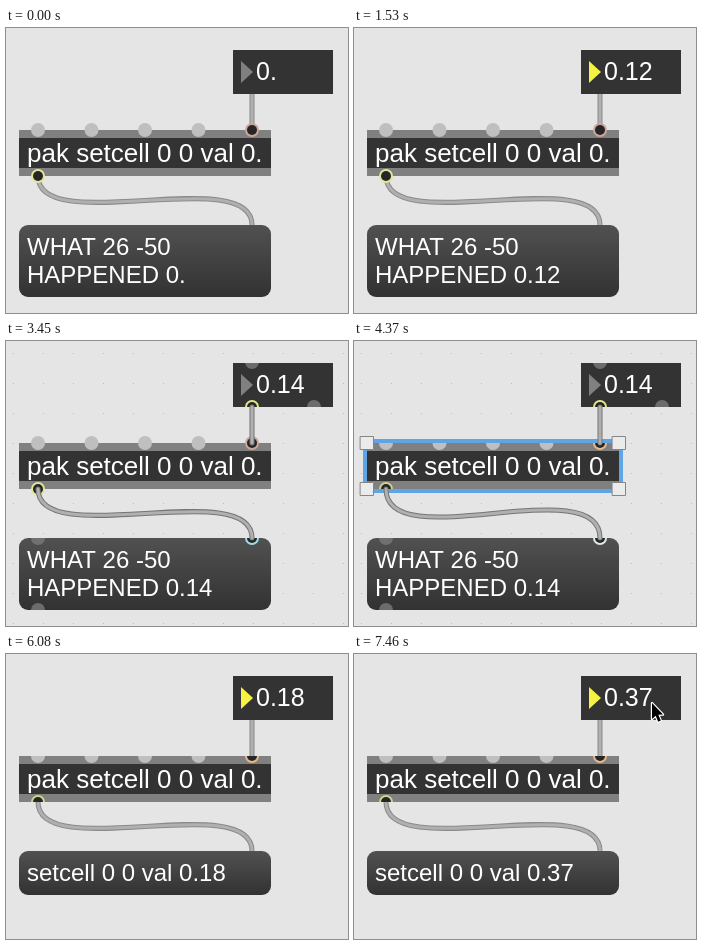
Animation, 342 px wide and 285 px high, one loop 7.5 s. Source, as an HTML page with a canvas:

```html
<!DOCTYPE html>
<html lang="en">
<head>
<meta charset="utf-8">
<title>Patch</title>
<style>
html, body { margin: 0; width: 100%; height: 100%; overflow: hidden; background: #e5e5e5; }
canvas { display: block; width: 342px; height: 285px; }
</style>
</head>
<body>
<canvas id="stage" width="342" height="285"></canvas>
<script>
const LOOP = 7500;
const UNLOCK = 2110, REBUILD = 4220, LOCK = 5320, DRAG = 5890;
const INLETS = [32, 85.5, 139, 192.5];
const canvas = document.getElementById('stage');
const ctx = canvas.getContext('2d');
const ratio = window.devicePixelRatio || 1;
canvas.width = 342 * ratio;
canvas.height = 285 * ratio;

// Pointer routes: [time, x, y]
const ROUTES = [
  [[1730, 298, 70], [1920, 287, 176], [2110, 287, 176], [2400, 264, 130], [2600, 264, 130], [2700, 257, 122]],
  [[5110, 262, 130], [5250, 292, 178], [5350, 292, 178], [5850, 298, 49], [5890, 298, 49]],
  [[6550, 298, 49], [6670, 298, 49]],
  [[7460, 298, 49], [7500, 298, 49]]
];

const within = (t, a, b) => t >= a && t < b;
const stepAt = (t, start, len, max) => Math.min(max, Math.floor((t - start) / len));

// Dragged value in hundredths
function valueAt(t) {
  if (t < 90) return 0;
  if (t < 930) return 8 - Math.abs(8 - stepAt(t, 90, 45, 16));
  if (t < DRAG) return stepAt(t, 930, 46, 15) - 1;
  if (t < 6670) return 14 + stepAt(t, DRAG, 47, 13);
  const k = stepAt(t, 6670, 41.6, 18);
  return 41 - Math.abs(14 - k);
}

const format = v => v === 0 ? '0.' : String(v / 100);

function pointerAt(t) {
  for (const route of ROUTES) {
    for (let i = 1; i < route.length; i++) {
      const [t0, x0, y0] = route[i - 1], [t1, x1, y1] = route[i];
      if (!within(t, t0, t1)) continue;
      const p = (t - t0) / (t1 - t0), e = p * p * (3 - 2 * p);
      return [x0 + (x1 - x0) * e, y0 + (y1 - y0) * e];
    }
  }
  return null;
}

function rect(x, y, w, h, color) {
  ctx.fillStyle = color;
  ctx.fillRect(x, y, w, h);
}

function disk(x, y, r, color) {
  ctx.beginPath();
  ctx.arc(x, y, r, 0, 7);
  ctx.fillStyle = color;
  ctx.fill();
}

function port(x, y, ring) {
  disk(x, y, 7, ring);
  disk(x, y, 5, '#262626');
}

function label(text, x, y, size) {
  ctx.font = size + 'px "Liberation Sans", Arial, sans-serif';
  ctx.fillStyle = '#fff';
  ctx.fillText(text, x, y);
}

function clipped(x, y, w, h, draw) {
  ctx.save();
  ctx.beginPath();
  ctx.rect(x, y, w, h);
  ctx.clip();
  draw();
  ctx.restore();
}

function polygon(points, color) {
  ctx.beginPath();
  points.forEach(([x, y]) => ctx.lineTo(x, y));
  ctx.closePath();
  ctx.fillStyle = color;
  ctx.fill();
}

function grid() {
  for (let x = 7; x < 342; x += 30)
    for (let y = 12; y < 285; y += 30) rect(x, y, 1, 1, '#bdbdbd');
}

function numberBox(v, active, open) {
  rect(227, 22, 100, 44, '#333');
  if (open) clipped(227, 22, 100, 44, () => {
    disk(246, 21, 7, '#6c6c6c');
    disk(308, 66, 7, '#6c6c6c');
    port(246, 66, '#e6e58a');
  });
  polygon([[235, 33], [247, 44], [235, 55]], active ? '#f5f243' : '#808080');
  label(format(v), 250, 52, 25);
}

function messageBox(lines, open, ring) {
  const h = lines.length > 1 ? 72 : 44;
  const fill = ctx.createLinearGradient(0, 197, 0, 197 + h);
  fill.addColorStop(0, '#515151');
  fill.addColorStop(1, '#323232');
  ctx.beginPath();
  ctx.roundRect(13, 197, 252, h, 9);
  ctx.fillStyle = fill;
  ctx.fill();
  if (open) clipped(13, 197, 252, h, () => {
    disk(32, 197, 7, '#707070');
    disk(32, 197 + h, 7, '#6c6c6c');
    port(246, 197, ring);
  });
  lines.forEach((s, i) => label(s, 21, 227 + i * 27.5, 24));
}

function objectBox(rebuilt, outlined) {
  if (outlined) rect(9, 98, 260, 54, '#5f a5e6'.replace(' ', ''));
  rect(13, 102, 252, 46, '#808080');
  rect(13, 110, 252, 30, '#333');
  const ports = () => {
    INLETS.forEach(x => disk(x, 102, 7, '#bfbfbf'));
    port(246, 102, rebuilt ? '#e5b98c' : '#cda49e');
    port(32, 148, rebuilt ? '#cfd48a' : '#e3e59a');
  };
  if (rebuilt) clipped(13, 102, 252, 46, ports);
  else ports();
  label('pak setcell 0 0 val 0.', 21, 134, 26);
}

function handles() {
  ctx.lineWidth = 1;
  ctx.strokeStyle = '#858585';
  for (const x of [13, 265])
    for (const y of [102, 148]) {
      rect(x - 7, y - 7, 14, 14, '#ebebeb');
      ctx.strokeRect(x - 6.5, y - 6.5, 13, 13);
    }
}

function cords(open, bend) {
  const trace = () => {
    ctx.beginPath();
    ctx.moveTo(246, 66);
    ctx.lineTo(246, 102);
    ctx.moveTo(32, 148);
    ctx.bezierCurveTo(32, 148 + bend, 246, 197 - bend, 246, 197);
  };
  ctx.lineCap = open ? 'round' : 'butt';
  for (const [width, color] of [[5, open ? '#757575' : '#8a8a8a'], [3, '#b0b0b0']]) {
    trace();
    ctx.lineWidth = width;
    ctx.strokeStyle = color;
    ctx.stroke();
  }
}

function arrow(x, y) {
  ctx.beginPath();
  [[0, 0], [0, 16], [3.7, 12.7], [6.2, 18.7], [8.8, 17.6], [6.3, 11.8], [11, 11.6]]
    .forEach(([dx, dy]) => ctx.lineTo(x + dx, y + dy));
  ctx.closePath();
  ctx.lineJoin = 'round';
  ctx.lineWidth = 2.4;
  ctx.strokeStyle = '#fff';
  ctx.stroke();
  ctx.fillStyle = '#000';
  ctx.fill();
}

function textPointer() {
  rect(259, 122, 1, 14, '#fff');
  rect(257, 121, 2, 1, '#fff');
  rect(260, 121, 2, 1, '#fff');
  rect(257, 136, 2, 1, '#fff');
  rect(260, 136, 2, 1, '#fff');
}

function draw(t) {
  ctx.setTransform(ratio, 0, 0, ratio, 0, 0);
  rect(0, 0, 342, 285, '#e5e5e5');
  const open = within(t, UNLOCK, LOCK);
  const rebuilt = t >= REBUILD;
  const selected = within(t, REBUILD, LOCK);
  const outlined = selected || within(t, 2350, 2700);
  const v = valueAt(t);
  const lines = t >= DRAG + 47
    ? ['setcell 0 0 val ' + format(v)]
    : ['WHAT 26 -50', 'HAPPENED ' + format(v)];

  if (open) grid();
  const bend = selected ? 69 : 62;
  if (!open) cords(false, bend);
  numberBox(v, within(t, 90, UNLOCK) || t >= DRAG, open);
  messageBox(lines, open, rebuilt ? '#dfe9e9' : '#9fdce4');
  objectBox(rebuilt, outlined);
  if (open) cords(true, bend);
  if (selected) handles();

  if (within(t, 3550, 3710) || within(t, 3910, REBUILD)) rect(263, 110, 1, 30, '#fff');
  if (within(t, 2700, 2910)) textPointer();
  const pointer = pointerAt(t);
  if (pointer) arrow(...pointer);
}

function frame() {
  draw(performance.now() % LOOP);
  requestAnimationFrame(frame);
}
frame();
</script>
</body>
</html>
```
